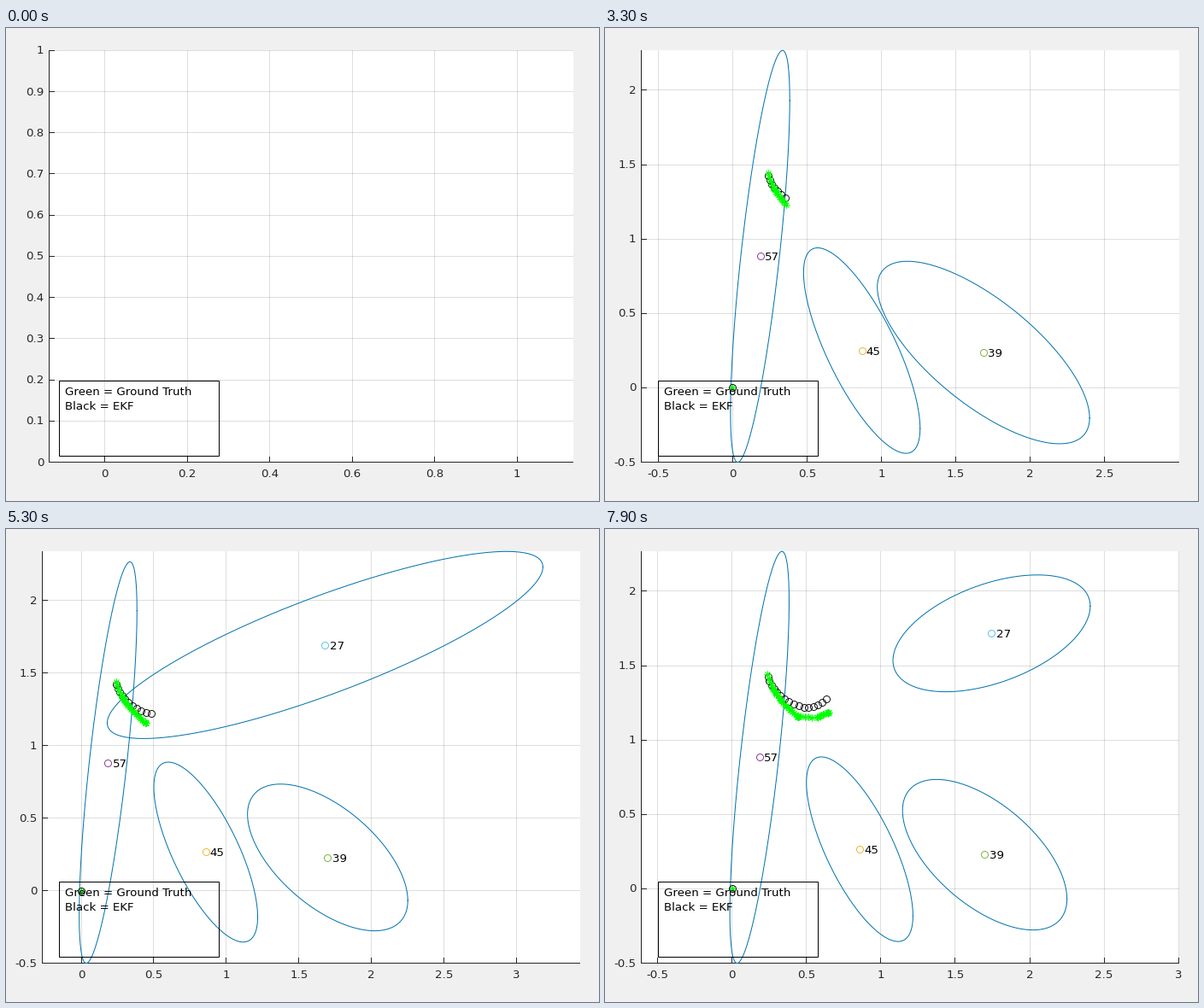
A matplotlib script that plays this animation: 694x554 px, repeating every 8 s.

```python
import matplotlib.pyplot as plt
import numpy as np
from matplotlib.animation import FuncAnimation
from matplotlib.patches import Rectangle

W, H, DPI = 694, 554, 64
PX = 72 / DPI                      # points per pixel
FRAMES, INTERVAL = 80, 100
TOP, BOTTOM = 26.3, 508.6
BLUE, INK, GREEN = "#0072AF", "#262626", "#00ff00"
START, SETTLED = 9, 45             # first pose; old landmarks stop improving
STAR = (8, 2, 0)

plt.rcParams["font.family"] = "DejaVu Sans"
plt.rcParams["font.size"] = 15


class Landmark:
    """Its covariance (xx, yy, xy) decays from first to last around t0."""

    def __init__(self, name, color, seen, t0, centre, first, last, tau=7):
        self.name, self.color, self.seen, self.t0 = name, color, seen, t0
        self.centre, self.tau = centre, tau
        self.first, self.last = np.array(first), np.array(last)

    def at(self, t):
        done = self.seen < SETTLED <= t
        left = 0 if done else np.exp((self.t0 - t) / self.tau)
        cov = self.last + (self.first - self.last) * left
        return along(self.centre, t), cov


def along(keys, t):
    """Position at time t on a path of (time, x, y) points."""
    times, xs, ys = zip(*keys)
    return np.array([np.interp(t, times, xs), np.interp(t, times, ys)])


LANDMARKS = [
    Landmark("57", "#7E2F8E", START, 9, [(0, .185, .8835)],
             (.0396, 1.9155, .2085), (.0396, 1.9155, .2085)),
    Landmark("45", "#EDB120", START, 15,
             [(15, .858, .193), (24, .881, .217), (33, .868, .25), (45, .858, .266)],
             (.457, 1.59, -.748), (.128, .385, -.16)),
    Landmark("39", "#77AC30", 21, 24,
             [(24, 1.652, .2645), (33, 1.685, .237), (45, 1.698, .229)],
             (.9545, .64, -.641), (.305, .256, -.164), 7.75),
    Landmark("27", "#4DBEEE", SETTLED, 45,
             [(45, 1.683, 1.6945), (60, 1.676, 1.6935), (75, 1.744, 1.717)],
             (5.049, .82, 1.864), (.41, .15, .11), 6.5),
]

# Estimated poses: every third one is given, a polynomial fills the rest
EST_KEYS = [(.241, 1.424), (.281, 1.346), (.352, 1.278),
            (.448, 1.228), (.548, 1.223), (.632, 1.277)]
EST = np.array([np.polyval(np.polyfit(range(6), c, 5), np.arange(16) / 3)
                for c in zip(*EST_KEYS)]).T

TRUTH = [(9, .235, 1.441), (15, .271, 1.347), (24, .306, 1.293),
         (33, .359, 1.232), (45, .437, 1.162), (53, .445, 1.157),
         (60, .568, 1.151), (72, .64, 1.182), (78, .652, 1.185)]
STAR_TIMES = np.arange(START, FRAMES, 1.5)
rng = np.random.default_rng(4)
STARS = np.array([along(TRUTH, t) for t in STAR_TIMES])
STARS += rng.uniform(-.004, .004, STARS.shape)


def ellipse(centre, cov):
    xx, yy, xy = cov
    t = np.linspace(0, 2 * np.pi, 241)
    root = np.linalg.cholesky([[xx, xy], [xy, yy]])
    return centre[:, None] + root @ [np.cos(t), np.sin(t)]


class View:
    """Equal-scale mapping from data to pixels, centred on the content."""

    def __init__(self, low, high, left, right):
        size = np.array([right - left, BOTTOM - TOP])
        self.left, self.right = left, right
        self.s = min(size / (high - low))
        mid, half = (low + high) / 2, size / self.s / 2
        self.xlim, self.ylim = zip(mid - half, mid + half)

    def x(self, v):
        return self.left + (np.asarray(v) - self.xlim[0]) * self.s

    def y(self, v):
        return BOTTOM - (np.asarray(v) - self.ylim[0]) * self.s


fig = plt.figure(figsize=(W / DPI, H / DPI), dpi=DPI, facecolor="#f0f0f0")
ax = fig.add_axes([0, 0, 1, 1])


def line(xs, ys, color, z=2, **kw):
    ax.plot(xs, ys, color=color, lw=PX, zorder=z, **kw)


def rule(xs, ys, z=1.5, **kw):
    """Straight line that fills exactly the pixels it passes through."""
    line(np.floor(xs), np.floor(ys), INK, z, **kw)


def marks(view, points, marker, color, z, weight=.9):
    xs, ys = np.transpose(points)
    ax.plot(view.x(xs), view.y(ys), ls="", marker=marker, ms=8 * PX, mfc="none",
            mec=color, mew=weight * PX, zorder=z)


def ticks(lim, step):
    first = np.ceil(lim[0] / step - 1e-6)
    last = np.floor(lim[1] / step + 1e-6)
    return np.arange(first, last + 1) * step


def draw_axes(view, xstep, ystep):
    l, r = view.left, view.right
    ax.add_patch(Rectangle((l - .5, 26), r - l + 1, 483,
                           fc="white", ec="none", zorder=0))
    for v in ticks(view.xlim, xstep):
        x = float(view.x(v))
        rule([x, x], [TOP, BOTTOM], 1, alpha=.15)
        rule([x, x], [BOTTOM, BOTTOM - 6])
        ax.text(x, 526, f"{round(v, 2) + 0:g}", ha="center", color=INK)
    for v in ticks(view.ylim, ystep):
        y = float(view.y(v))
        rule([l, r], [y, y], 1, alpha=.15)
        rule([l, l + 6], [y, y])
        ax.text(l - 6, y + 4, f"{round(v, 2) + 0:g}", ha="right", color=INK)
    rule([l, l, r], [TOP, BOTTOM, BOTTOM])


def draw_note():
    ax.add_patch(Rectangle((62, 413), 187, 88, fill=False, ec="black",
                           lw=PX, zorder=6))
    ax.text(69, 430, "Green = Ground Truth", zorder=6)
    ax.text(69, 447, "Black = EKF", zorder=6)


def draw_triad(view, x, y, heading, size=.038):
    for turn, color in ((0, "red"), (90, "blue")):
        ang = heading + np.radians(turn)
        line(view.x([x, x + size * np.cos(ang)]),
             view.y([y, y + size * np.sin(ang)]), color, 3.5)


def draw_pose(view, n, t):
    k = max(n, 1)
    dx, dy = EST[k] - EST[k - 1]
    draw_triad(view, *EST[n], np.arctan2(dy, dx))
    draw_triad(view, 0, 0, 0)
    u = np.clip((t - 15) / 45, 0, 1)
    cov = np.array([.0497, .0835, .0122]) - u * np.array([.0072, .0175, .0122])
    ex, ey = ellipse(EST[n], cov)
    line(view.x(ex), view.y(ey), BLUE)


def draw(i):
    ax.clear()
    ax.set(xlim=(0, W), ylim=(H, 0))
    ax.axis("off")
    draw_note()
    if i < START:
        draw_axes(View(np.zeros(2), np.ones(2), 50.5, 663.5), .2, .1)
        return

    t = i - i % 3                  # the filter updates every third frame
    shown = [(m, *m.at(t)) for m in LANDMARKS if m.seen <= t]
    mid = np.array([c for _, c, _ in shown])
    reach = np.sqrt([cov[:2] for _, _, cov in shown])
    view = View((mid - reach).min(axis=0), (mid + reach).max(axis=0), 42.5, 671.5)
    draw_axes(view, .5, .5)

    for m, c, cov in shown:
        ex, ey = ellipse(c, cov)
        line(view.x(ex), view.y(ey), BLUE)
        marks(view, [c], "o", m.color, 3)
        ax.text(view.x(c[0] + .03), view.y(c[1]) + 5, m.name)

    n = min((t - START) // 4, len(EST) - 1)
    marks(view, EST[:n + 1], "o", "black", 3)
    marks(view, STARS[STAR_TIMES <= i], STAR, GREEN, 4, .75)
    marks(view, [(0, 0)], STAR, GREEN, 4, .75)
    marks(view, [(0, 0)], "o", "black", 5)

    # The pose overlay is wiped and redrawn faster than the frame rate
    if (.3695 * (i - 16) + .23) % 1 < .5:
        draw_pose(view, n, t)


anim = FuncAnimation(fig, draw, frames=FRAMES, interval=INTERVAL,
                     init_func=lambda: None, repeat=True, repeat_delay=0)
plt.show()
```
